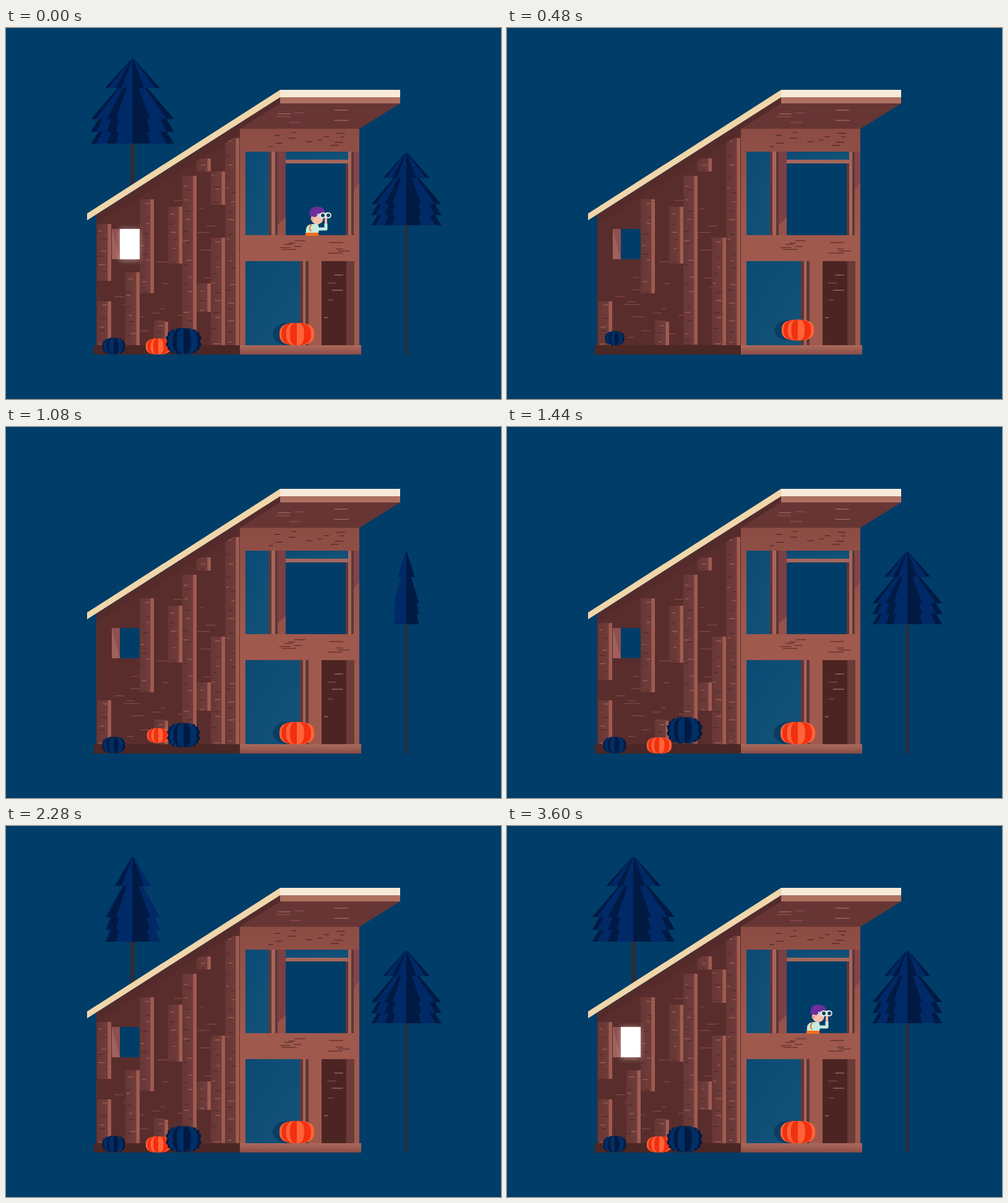
These frames come from a looping animation (800x600 px, 3690 ms). An HTML page:

```html
<!DOCTYPE html>
<html lang="en">
<head>
<meta charset="utf-8">
<title>Cabin at night</title>
<style>
html, body { margin: 0; width: 100%; height: 100%; overflow: hidden; background: #003d68; }
svg { display: block; width: 100vw; height: 100vh; }
</style>
</head>
<body>
<svg id="stage" viewBox="0 0 800 600">
<defs>
  <linearGradient id="wood">
    <stop offset="0" stop-color="#673735"/><stop offset="1" stop-color="#723f3c"/>
  </linearGradient>
  <linearGradient id="front" x2="0" y2="1">
    <stop offset="0" stop-color="#8b4c43"/><stop offset=".3" stop-color="#98544a"/><stop offset=".5" stop-color="#a0594d"/>
  </linearGradient>
  <linearGradient id="step" x2="0" y2="1">
    <stop offset="0" stop-color="#ab6a5c"/><stop offset="1" stop-color="#8b4d46"/>
  </linearGradient>
  <linearGradient id="glass" y2="1">
    <stop offset="0" stop-color="#0b4a73"/><stop offset="1" stop-color="#145379"/>
  </linearGradient>
  <clipPath id="opening"><path d="M452 219H549V336H452Z"/></clipPath>
  <clipPath id="pane"><path d="M387 377H475V513H387Z"/></clipPath>
  <filter id="blur" x="-50%" y="-50%" width="200%" height="200%"><feGaussianBlur stdDeviation="4"/></filter>
</defs>
</svg>
<script>
const LOOP = 3690;
const stage = document.getElementById('stage');

function add(parent, tag, attrs = {}) {
  const node = document.createElementNS('http://www.w3.org/2000/svg', tag);
  for (const key in attrs) node.setAttribute(key, attrs[key]);
  return parent.appendChild(node);
}
const group = (parent = stage, attrs) => add(parent, 'g', attrs);
const rect = (p, x, y, width, height, fill) => add(p, 'rect', { x, y, width, height, fill });
const path = (p, d, fill, extra) => add(p, 'path', { d, fill, ...extra });
const oval = (p, cx, cy, rx, ry, fill) => add(p, 'ellipse', { cx, cy, rx, ry, fill });

let seed = 11;
const random = () => (seed = seed * 16807 % 2147483647) / 2147483647;

// Wood grain: short dashes spread evenly down an area
function grain(p, x, y, w, h, count, length, ...colors) {
  for (let i = 0; i < count; i++) {
    const size = Math.min(w, length * (.5 + random()));
    rect(p, x + random() * (w - size), y + (i + random()) / count * h, size, 1.2, colors[i % colors.length]);
  }
}

// Folded paper: nested facets of alternating colour on both sides of a spine
const FACETS = { '-1': [1, .88, .62, .4], 1: [1, .82, .42] };
function paper(parent, outline, colors) {
  const facets = [];
  for (const side of [-1, 1]) {
    FACETS[side].forEach((size, i) => facets.push({ side, size, node: path(parent, outline, colors[i % 2]) }));
  }
  const open = k => facets.forEach(({ side, size, node }) =>
    node.setAttribute('transform', `scale(${side * Math.min(k, size)} 1)`));
  open(1);
  return open;
}

const NIGHT = ['#001a43', '#002967'];
const BUSH = ['#001a43', '#002f66'];
const ORANGE = ['#ff6439', '#f3300f'];

// Trees
function treeOutline(half, height) {
  const tier = (w, y) => `L${w * half} ${(y - 1) * height}`;
  const low = [.71, .86, 1].map(y => tier(1, y) + (y < 1 ? tier(.82, y) : '')).join('');
  return `M0 ${-height}h2${tier(.66, .343)}${tier(.36, .343)}${low}H0Z`;
}

function makeTree(x, half, height, base, ground, trunkWidth) {
  const root = group();
  const trunk = rect(root, x - trunkWidth / 2, base, trunkWidth, ground - base, '#322a30');
  const crown = group(root);
  const open = paper(crown, treeOutline(half, height), NIGHT);
  return function (grow, rise, spread) {
    const top = ground - (ground - base) * grow;
    trunk.setAttribute('y', top);
    trunk.setAttribute('height', ground - top);
    crown.setAttribute('transform', `translate(${x} ${top}) scale(1 ${rise})`);
    open(rise ? Math.max(.04, spread) : 0);
  };
}
const leftTree = makeTree(204.5, 67, 137, 187, 260, 6);
const rightTree = makeTree(647, 56.5, 117, 319, 528, 4);

// Side wall
const house = group();
path(house, 'M146 305L443 113L378 165V513H146ZM184 325V374H216V325Z', '#592d2c', { 'fill-rule': 'evenodd' });
path(house, 'M171 325H184V374H171Z', '#8e5050');
path(house, 'M171 325L184 374H171Z', '#a0605b');
grain(house, 150, 400, 130, 110, 12, 20, '#834c47');
grain(house, 245, 265, 100, 235, 16, 13, '#834c47');

// Planks hang in columns of equal pitch
function plank(column, top, bottom) {
  const g = group(house), x = 147 + 23 * column, h = bottom - top;
  rect(g, x, top, 23, h, 'url(#wood)');
  rect(g, x + 17.5, top, 5.5, h, '#a05c51');
  grain(g, x + 1, top + 4, 16, h - 6, Math.ceil(h / 16), 7, '#a1655d', '#4e2827');
  return g;
}
[[0, 442, 513], [3, 277, 429], [4, 475, 513], [5, 289, 381], [6, 239, 512],
 [7, 211, 232], [8, 339, 513], [9, 178, 513]].forEach(p => plank(...p));

const sliders = [
  { node: plank(7, 413, 459), start: 720, dx: 0, dy: 30 },
  { node: plank(0, 317, 409), start: 1170, dx: -12, dy: 0 },
  { node: plank(2, 395, 513), start: 1950, dx: 0, dy: -50 },
  { node: plank(8, 232, 286), start: 2430, dx: 0, dy: -63 }
];

const lamp = group(house);
add(lamp, 'rect', { x: 184, y: 325, width: 32, height: 51, fill: '#ffe7d8', opacity: .5, filter: 'url(#blur)' });
rect(lamp, 184, 325, 32, 49, '#fff');

// Roof
path(house, 'M146 302L443 112V122L378 165V171L146 317Z', '#552a2a');
path(house, 'M443 122H637L571 163H378Z', '#673634');
path(house, 'M131 300L443 100V112L131 311Z', '#f0d6aa');
rect(house, 443, 100, 194, 12, '#f8ead8');
rect(house, 443, 112, 194, 10, '#ad7061');
grain(house, 430, 129, 150, 24, 6, 17, '#a66c69', '#8f4f56');

// Front
path(house, 'M378 163H571V513H378ZM452 219V335H549V219Z', 'url(#front)', { 'fill-rule': 'evenodd' });
grain(house, 400, 167, 150, 25, 12, 11, '#4c2624');
grain(house, 384, 342, 184, 22, 10, 20, '#5a2d2b');

function stripes(x, y, h, ...bands) {
  for (const [width, fill] of bands) {
    rect(house, x, y, width, h, fill);
    x += width;
  }
}
const DARK = '#613637', LIGHT = '#a5665a';
stripes(387, 200, 135, [38, 'url(#glass)'], [4, DARK], [6, LIGHT], [4, DARK], [13, '#7b4043']);
path(house, 'M439 318L452 306V335H439Z', '#94524a');
rect(house, 452, 200, 101, 13, 'url(#glass)');
rect(house, 452, 213, 101, 6, LIGHT);
stripes(549, 219, 116, [4, DARK]);
stripes(553, 200, 135, [5, LIGHT], [4, DARK]);
path(house, 'M562 200H571V250L562 262Z', '#824548');
stripes(387, 377, 136, [88, 'url(#glass)'], [5, DARK], [4, LIGHT], [5, DARK]);
stripes(510, 377, 136, [40, '#4c2523'], [13, '#6b3b37']);
grain(house, 512, 384, 34, 85, 5, 12, '#a8706a', '#8b4c55');

rect(house, 142, 513, 236, 15, '#4b2725');
rect(house, 378, 513, 196, 15, 'url(#step)');

// Watcher in the upper window
const room = group(stage, { 'clip-path': 'url(#opening)' });
const watcher = group(room);
rect(watcher, 484, 330, 21, 12, '#f37021');
path(watcher, 'M485 331Q483 318 495 317H504Q507 324 505 331Z', '#c4ebdd');
path(watcher, 'M494 318Q488 323 493 329', 'none', { stroke: '#f37021', 'stroke-width': 2 });
path(watcher, 'M501 325H517V316', 'none', { stroke: '#c4ebdd', 'stroke-width': 5, 'stroke-linejoin': 'round' });
rect(watcher, 515, 307, 4, 10, '#f5b9a5');
oval(watcher, 503, 307, 10, 10.5, '#f7c0ad');
oval(watcher, 495, 309, 2.5, 2.5, '#eda392');
path(watcher, 'M491 304Q489 289 503 289Q515 289 516 299L505 301L500 306Z', '#6c2f9c');
path(watcher, 'M502 301L521 298V307H507Z', '#c6d8dc');
for (const x of [512, 521]) {
  oval(watcher, x, 303, 4.8, 4.8, '#eef5f2');
  oval(watcher, x, 303, 3, 3, '#163d55');
}

// Plants: boxy rounded outlines, scalloped for bushes
function roundOutline(rx, ry, scallop) {
  let d = `M0 ${-ry}`;
  for (let i = 1; i <= 72; i++) {
    const a = i / 72 * Math.PI, c = Math.cos(a);
    const r = 1 - scallop * (1 - Math.abs(Math.sin(a * 8)));
    const x = rx * r * Math.abs(Math.sin(a)) ** .75;
    const y = -ry * r * Math.sign(c) * Math.abs(c) ** .75;
    d += `L${x.toFixed(1)} ${y.toFixed(1)}`;
  }
  return d + 'Z';
}

function plant(x, y, rx, ry, colors, scallop, start, span, lift) {
  const node = group();
  paper(node, roundOutline(rx, ry, scallop), colors);
  return { node, x, y, start, span, lift };
}
const shade = group(stage, { 'clip-path': 'url(#pane)' });
const shadow = oval(shade, 0, 0, 24, 18, '#0b3d62');
const plants = [
  plant(470, 495, 28, 18, ORANGE, 0, 232, 480, 7),
  plant(174, 514.5, 19, 13.5, BUSH, .09, 283, 450, 16),
  plant(246, 515, 20, 13, ORANGE, 0, 855, 480, 19),
  plant(287, 506.5, 29, 21.5, BUSH, .09, 832, 850, 17)
];

// Motion
const progress = (t, start, span) => Math.max(0, Math.min(1, (t - start) / span));
const easeOut = p => 1 - (1 - p) ** 3;
const easeInOut = p => p * p * (3 - 2 * p);
const backOut = p => 1 + 2.7 * (p - 1) ** 3 + 1.7 * (p - 1) ** 2;
const place = (node, x, y, scale = 1) => node.setAttribute('transform', `translate(${x} ${y}) scale(${scale})`);

function draw(time) {
  // The finished scene holds briefly, then the build starts over
  const t = time < 60 ? LOOP : time;

  const sprout = (tree, start, spread) =>
    tree(easeOut(progress(t, start, 220)), easeOut(progress(t, start + 120, 210)), easeInOut(spread));
  sprout(rightTree, 690, progress(t, 865, 535));
  sprout(leftTree, 1860, progress(t, 2190, 150));

  for (const { node, start, dx, dy } of sliders) {
    const left = 1 - easeOut(progress(t, start, 220));
    place(node, dx * left, dy * left);
    node.setAttribute('opacity', progress(t, start, 90));
  }

  for (const { node, x, y, start, span, lift } of plants) {
    const size = easeOut(progress(t, start, 420));
    const hop = lift * Math.sin(Math.PI * progress(t, start, span) ** 1.5);
    place(node, x, y - hop, size);
    if (node === plants[0].node) place(shadow, x - 15, y - hop, size);
  }

  lamp.setAttribute('opacity', progress(t, 2580, 150));
  place(watcher, 0, 50 * (1 - backOut(progress(t, 3300, 300))));
}

const begin = performance.now();
function frame() {
  draw((performance.now() - begin) % LOOP);
  requestAnimationFrame(frame);
}
frame();
</script>
</body>
</html>
```
